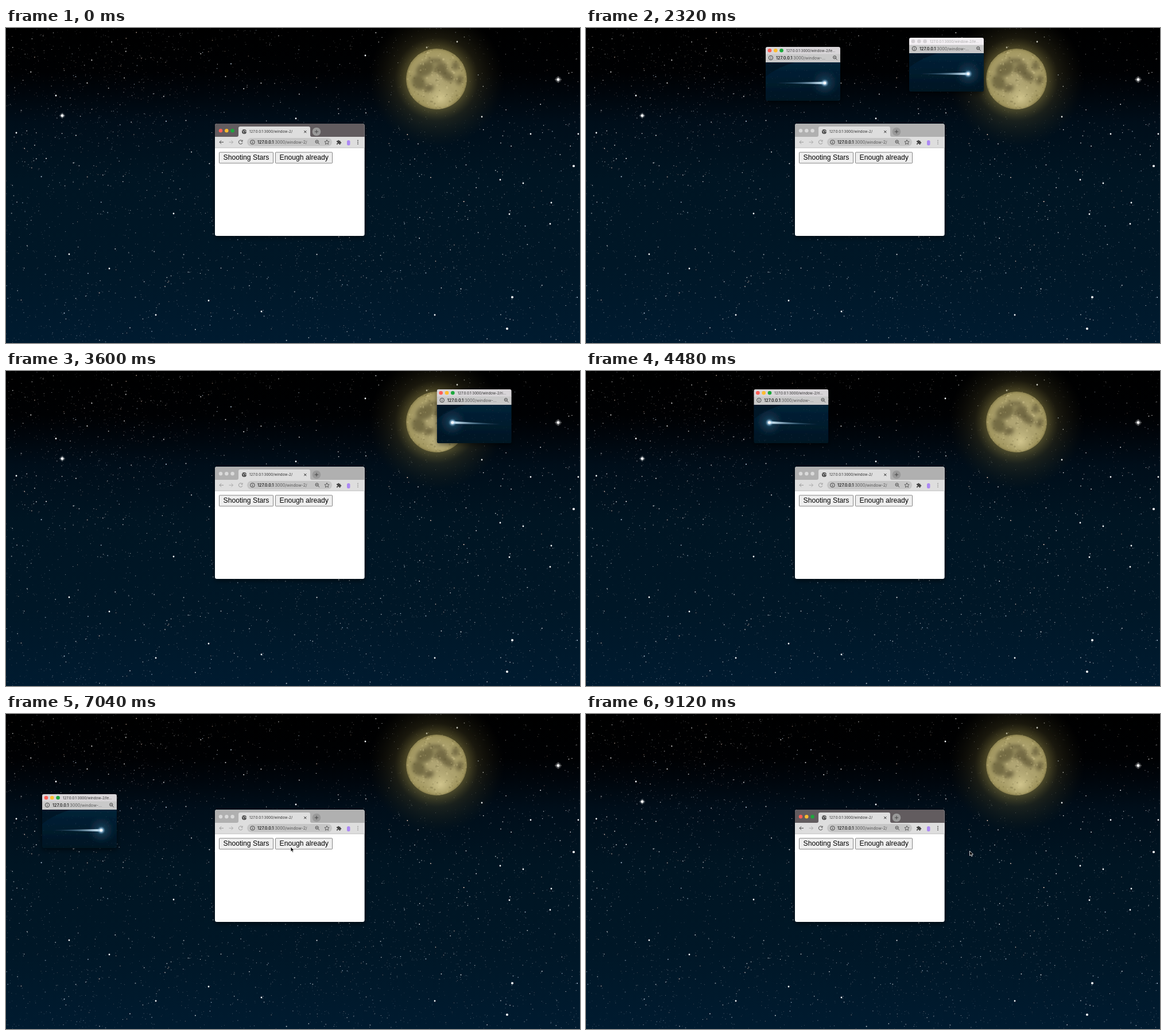
Animation of 1000x550 px, one loop 9200 ms. Source, as an HTML page with a canvas:

```html
<!DOCTYPE html>
<html lang="en">
<head>
<meta charset="utf-8">
<title>Shooting Stars</title>
<style>
  html, body { margin: 0; width: 100%; height: 100%; overflow: hidden; background: #00101f; }
  canvas, svg { position: absolute; left: 0; top: 0; width: 1000px; height: 550px; }
  text { font-family: Inter, Roboto, sans-serif; fill: #333; white-space: pre; }
  .title { font-size: 6.25px; }
  .url { font-size: 7.1px; fill: #555; }
  .host { font-weight: 600; fill: #222; }
  .label { font: 12.2px "Liberation Sans", Arial, sans-serif; fill: #000; }
  .line { fill: none; stroke: #444; stroke-width: 1; }
  .bar { fill: #f3eff3; }
  .light { fill: #d4d0d4; }
  .popup .title { fill: #aaa; }
  .popup.active .bar { fill: #d8d5d8; }
  .popup.active .title { fill: #333; }
  #main .bar { fill: #b0b0b0; }
  #main .light { fill: #dadada; }
  #main .nav { stroke: #999; }
  #main .dots { fill: #999; }
  #main .plus { fill: #999; }
  #main.active .bar { fill: #625c5f; }
  #main.active .nav { stroke: #444; }
  #main.active .dots { fill: #444; }
  .active .red { fill: #ff5f57 !important; }
  .active .yellow { fill: #febc2e !important; }
  .active .green { fill: #1fa83c !important; }
</style>
</head>
<body>
<canvas id="sky" width="1000" height="550"></canvas>
<svg id="stage" viewBox="0 0 1000 550"></svg>
<script>
const LOOP = 9200, TICK = 80, STEP = 41.667, LAST_STEP = 20;

// y, birth time, milliseconds per step, direction
const POPUPS = [
  [17, 1280, 80, 'le'],
  [33, 1760, 80, 'le'],
  [32, 3440, 80, 'ri'],
  [398, 4880, 80, 'le'],
  [140, 6965, 61, 'le'],
  [-1, 7335, 61, 'ri'],
  [167, 7640, 61, 'ri'],
].map(([y, born, pace, side]) => ({ y, born, pace, side }));

// time, x, y of the pointer tip; hidden outside each run
const POINTER_RUNS = [
  [[480, 668, 300], [900, 425, 231], [1280, 425, 231], [1760, 668, 560]],
  [[6320, 610, 400], [6720, 496, 232], [8560, 496, 232], [9040, 668.5, 239], [9200, 668.5, 239]],
];

function seeded(seed) {
  return () => {
    seed = (seed + 0x6D2B79F5) | 0;
    let n = Math.imul(seed ^ (seed >>> 15), 1 | seed);
    n = (n + Math.imul(n ^ (n >>> 7), 61 | n)) ^ n;
    return ((n ^ (n >>> 14)) >>> 0) / 4294967296;
  };
}

const ctx = document.getElementById('sky').getContext('2d');

function dot(x, y, r, color) {
  ctx.fillStyle = color;
  ctx.beginPath();
  ctx.arc(x, y, r, 0, Math.PI * 2);
  ctx.fill();
}

function radial(x, y, r, stops) {
  const g = ctx.createRadialGradient(x, y, 0, x, y, r);
  stops.forEach(([at, color]) => g.addColorStop(at, color));
  dot(x, y, r, g);
}

function drawSky() {
  const g = ctx.createLinearGradient(0, 0, 0, 550);
  [[0, '#000'], [.14, '#000103'], [.2, '#00050b'], [.3, '#000e1a'], [.48, '#001523'], [.75, '#001727'], [1, '#001b30']]
    .forEach(([at, color]) => g.addColorStop(at, color));
  ctx.fillStyle = g;
  ctx.fillRect(0, 0, 1000, 550);
}

function drawStars() {
  const rand = seeded(7);
  // x, y, spread, weight
  const clouds = [[180, 50, 150, .5], [860, 350, 150, .4], [570, 430, 110, .4], [130, 500, 130, .35],
    [170, 370, 75, -.35], [940, 60, 80, -.2], [400, 130, 80, -.15]];
  const density = (x, y) => clouds.reduce((sum, [cx, cy, s, w]) =>
    sum + w * Math.exp(-((x - cx) ** 2 + (y - cy) ** 2) / (2 * s * s)), .5);
  for (let i = 0; i < 7200; i++) {
    const x = rand() * 1000, y = rand() * 550, size = rand(), glow = rand(), tint = rand();
    if (rand() > density(x, y)) continue;
    const alpha = .25 + .65 * glow * glow;
    const rgb = tint < .12 ? '255,220,200' : tint < .3 ? '205,225,245' : '255,255,255';
    dot(x, y, .42 + .65 * size ** 7, `rgba(${rgb},${alpha})`);
  }
  const bright = [[989, 241], [882, 470], [873, 525], [292, 324], [997, 185], [877, 325], [626, 48],
    [87, 118], [914, 185], [505, 158], [861, 265], [901, 271], [948, 342], [180, 420], [261, 501],
    [353, 476], [733, 34], [786, 24], [829, 155], [18, 183], [110, 395], [445, 495], [747, 501], [950, 305]];
  bright.forEach(([x, y], i) => dot(x, y, i < 3 ? 2.1 : 1.4, '#f4f7f8'));
  [[962, 90, 6], [98, 153, 5]].forEach(([x, y, r]) => {
    radial(x, y, r, [[0, 'rgba(255,255,255,.7)'], [1, 'rgba(255,255,255,0)']]);
    ctx.strokeStyle = 'rgba(255,255,255,.6)';
    ctx.lineWidth = .6;
    ctx.beginPath();
    ctx.moveTo(x - r, y); ctx.lineTo(x + r, y);
    ctx.moveTo(x, y - r); ctx.lineTo(x, y + r);
    ctx.stroke();
    dot(x, y, 2.2, '#fff');
  });
}

function drawMoon() {
  radial(750, 89, 118, [[0, 'rgba(125,116,60,.85)'], [.45, 'rgba(125,116,60,.6)'],
    [.62, 'rgba(85,78,40,.3)'], [1, 'rgba(50,45,20,0)']]);
  ctx.save();
  ctx.beginPath();
  ctx.arc(750, 89, 53, 0, Math.PI * 2);
  ctx.clip();
  radial(750, 89, 53, [[0, '#b0a574'], [.7, '#ada26d'], [.93, '#a1965f'], [1, '#877d4c']]);
  ctx.filter = 'blur(3px)';
  // x, y, radii, tilt of the dark plains
  [[730, 72, 17, 12, -.5], [719, 95, 14, 11, 1], [758, 71, 11, 11, 0], [770, 84, 12, 8, .6],
    [783, 66, 6, 8, 0], [737, 105, 9, 7, 0], [790, 91, 6, 9, .3], [747, 57, 14, 4, 0]]
    .forEach(([x, y, rx, ry, tilt]) => {
      ctx.fillStyle = 'rgba(91,83,50,.68)';
      ctx.beginPath();
      ctx.ellipse(x, y, rx, ry, tilt, 0, Math.PI * 2);
      ctx.fill();
    });
  ctx.filter = 'none';
  radial(757, 123, 25, [[0, 'rgba(224,212,155,.7)'], [1, 'rgba(205,195,140,0)']]);
  const rand = seeded(31);
  for (let i = 0; i < 230; i++) {
    const tone = rand() < .5 ? '221,210,155' : '88,79,43';
    dot(697 + rand() * 106, 36 + rand() * 106, .5 + rand() * 1.5, `rgba(${tone},.24)`);
  }
  ctx.restore();
}

const rect = (x, y, w, h, attrs) => `<rect x="${x}" y="${y}" width="${w}" height="${h}" ${attrs}/>`;
const circle = (x, y, r, attrs) => `<circle cx="${x}" cy="${y}" r="${r}" ${attrs}/>`;
const path = (d, cls = 'line', attrs = '') => `<path d="${d}" class="${cls}" ${attrs}/>`;
const text = (x, y, cls, content) => `<text x="${x}" y="${y}" class="${cls}">${content}</text>`;
const lights = (x, y, r) => ['red', 'yellow', 'green']
  .map((name, i) => circle(x + i * 10.3, y, r, `class="light ${name}"`)).join('');
const info = (x, y) => circle(x, y, 3.7, 'class="line" stroke-width=".9"') +
  path(`M${x} ${y - 2}v1M${x} ${y - .3}v2.4`);
const magnifier = (x, y) => circle(x - .8, y - .8, 2.6, 'class="line"') +
  path(`M${x + 1.2} ${y + 1.2}l2.4 2.4M${x - 2} ${y - .8}h2.4`);
const url = (x, y, tail) => text(x, y, 'url', `<tspan class="host">127.0.0.1</tspan>:3000/${tail}`);

function cometPicture(side) {
  const rand = seeded(side === 'le' ? 3 : 4);
  let out = rect(0, 27, 130, 67, 'fill="url(#night)"');
  out += path('M0 27H50Q18 37 0 52Z', '', 'fill="#000d18" opacity=".45"');
  for (let i = 0; i < 90; i++) {
    out += circle((rand() * 130).toFixed(1), (28 + rand() * 65).toFixed(1), .4,
      `fill="#9ab" opacity="${(.1 + rand() * .35).toFixed(2)}"`);
  }
  const comet = circle(0, 0, 25, 'fill="url(#haze)"') +
    path('M0 -2.3L-86 -.4V.4L0 2.3Z', '', 'fill="url(#tail)"') +
    path('M0 -.8L-65 0L0 .8Z', '', 'fill="url(#tail)"') +
    circle(0, 0, 7, 'fill="url(#head)"') + circle(0, 0, 2.2, 'fill="#fff"');
  const place = side === 'le' ? 'translate(103 63)' : 'translate(27 58) rotate(2) scale(-1 1)';
  return out + `<g transform="${place}">${comet}</g>`;
}

function popupMarkup({ side }) {
  return `<g class="popup" filter="url(#shadow)"><g clip-path="url(#popupShape)">` +
    rect(0, 0, 130, 13, 'class="bar"') + rect(0, 12.5, 130, 14.5, 'fill="#c9c9c9"') +
    lights(7, 6.2, 3.3) + text(36, 8.6, 'title', `127.0.0.1:3000/window-2/${side}...`) +
    info(9, 19) + url(18, 21.6, 'window-...') + magnifier(121, 19) +
    cometPicture(side) + '</g></g>';
}

function mainMarkup() {
  const button = (x, w, label) =>
    rect(x, 217, w, 19, 'fill="#efefef" stroke="#858585" stroke-width="1" rx=".8"') +
    text(x + 7, 230.4, 'label', label);
  return `<g id="main" filter="url(#shadow)"><g clip-path="url(#mainShape)">` +
    rect(364, 167, 261, 196, 'fill="#fff"') + rect(364, 167, 261, 24, 'class="bar"') +
    path('M402 190Q405 190 405 187V175Q405 172 408 172H527Q530 172 530 175V187Q530 190 533 190Z', '', 'fill="#dedede"') +
    rect(364, 190, 261, 19, 'fill="#dedede"') + rect(364, 208.7, 261, .9, 'fill="#b8b8b8"') +
    rect(420, 192, 148, 14.5, 'rx="7.25" fill="#c6c6c6"') +
    lights(374, 179.3, 3.2) +
    circle(415, 181, 4, 'fill="#444"') + path('M412 179.5l2.3 .8l-.5 1.8l1.2 1.8M416 178l-.5 1.5l2.8 .7l-.8 2', 'line', 'style="stroke:#ddd;stroke-width:.9"') +
    text(424, 183.4, 'title', '127.0.0.1:3000/window-2/') +
    path('M519.3 179.2l4 4m0 -4l-4 4', 'line', 'style="stroke:#222"') +
    circle(541, 181, 7.3, 'class="plus" fill="#999"') + path('M537.8 181h6.4M541 177.8v6.4') +
    path('M379 199.3h-7m3 -3l-3 3l3 3', 'line nav') +
    path('M388.5 199.3h7m-3 -3l3 3l-3 3', 'line', 'style="stroke:#aaa"') +
    path('M411.6 197.3a3.4 3.4 0 1 0 .4 3M412 195.5v2.5h-2.5', 'line nav') +
    info(429.5, 199.3) + url(438, 201.9, 'window-2/') + magnifier(542.5, 199.3) +
    path('M559 195.3l1.2 2.7l2.9 .3l-2.2 1.9l.7 2.9l-2.6 -1.5l-2.6 1.5l.7 -2.9l-2.2 -1.9l2.9 -.3Z', 'line', 'style="stroke-width:.8"') +
    path('M576 197h2a1.3 1.3 0 1 1 2.6 0h2v2a1.3 1.3 0 1 1 0 2.5v2h-2.3a1.3 1.3 0 1 0 -2.5 0H576v-2a1.3 1.3 0 1 0 0 -2.5Z', '', 'fill="#444"') +
    rect(594, 196, 5.5, 9, 'rx="2.5" fill="#ac87f4"') +
    [196.4, 199.4, 202.4].map(y => circle(613, y, .9, 'class="dots"')).join('') +
    button(371.5, 94, 'Shooting Stars') + button(469.5, 99, 'Enough already') + '</g></g>';
}

const gradient = (id, stops, attrs = '', kind = 'radial') => `<${kind}Gradient id="${id}" ${attrs}>` +
  stops.map(([at, color, alpha = 1]) => `<stop offset="${at}" stop-color="${color}" stop-opacity="${alpha}"/>`).join('') +
  `</${kind}Gradient>`;

const stage = document.getElementById('stage');
stage.innerHTML = '<defs>' +
  gradient('night', [[0, '#052238'], [1, '#001523']], 'x2="0" y2="1"', 'linear') +
  gradient('haze', [[0, '#387799', .55], [1, '#12334c', 0]]) +
  gradient('head', [[0, '#fff'], [.4, '#c5e3fa', .75], [1, '#5594be', 0]]) +
  gradient('tail', [[0, '#5686a5', 0], [.4, '#6796b4', .4], [1, '#d9effc', .95]], '', 'linear') +
  `<clipPath id="popupShape">${rect(0, 0, 130, 94, 'rx="3"')}</clipPath>` +
  `<clipPath id="mainShape">${rect(364, 167, 260.6, 196, 'rx="3.5"')}</clipPath>` +
  '<filter id="shadow" x="-20%" y="-20%" width="140%" height="150%"><feDropShadow dx="0" dy="3" stdDeviation="4" flood-color="#000" flood-opacity=".55"/></filter></defs>' +
  POPUPS.map(popupMarkup).join('') + mainMarkup() +
  '<path id="pointer" d="M0 0V8.4L1.9 6.7L3.2 9.6L4.7 8.9L3.4 6.1H6Z" fill="#000" stroke="#fff" stroke-width=".8"/>';

const popupNodes = [...stage.querySelectorAll('.popup')];
const mainNode = document.getElementById('main');
const pointer = document.getElementById('pointer');

function show(node, visible, x = 0, y = 0) {
  node.style.display = visible ? '' : 'none';
  if (visible) node.setAttribute('transform', `translate(${x} ${y})`);
}

function placePointer(t) {
  const run = POINTER_RUNS.find(keys => t >= keys[0][0] && t < keys[keys.length - 1][0]);
  if (!run) return show(pointer, false);
  const i = run.findIndex(key => key[0] > t);
  const [t0, x0, y0] = run[i - 1], [t1, x1, y1] = run[i];
  const p = (t - t0) / (t1 - t0), ease = p * p * (3 - 2 * p);
  show(pointer, true, x0 + (x1 - x0) * ease, y0 + (y1 - y0) * ease);
}

function render(t) {
  let newest = -1;
  POPUPS.forEach(({ y, born, pace, side }, i) => {
    const step = Math.floor((t - born) / pace);
    const alive = step >= 0 && step <= LAST_STEP;
    const x = side === 'le' ? 21.3 + STEP * step : .7 + STEP * (LAST_STEP - step);
    show(popupNodes[i], alive, x, y);
    if (alive) newest = i;
  });
  popupNodes.forEach((node, i) => node.classList.toggle('active', i === newest));
  mainNode.classList.toggle('active', t < POPUPS[0].born || t >= 8960);
  placePointer(t);
}

drawSky();
drawStars();
drawMoon();

const start = performance.now();
function frame() {
  const t = (performance.now() - start) % LOOP;
  render(Math.floor(t / TICK) * TICK);
  requestAnimationFrame(frame);
}
frame();
</script>
</body>
</html>
```
